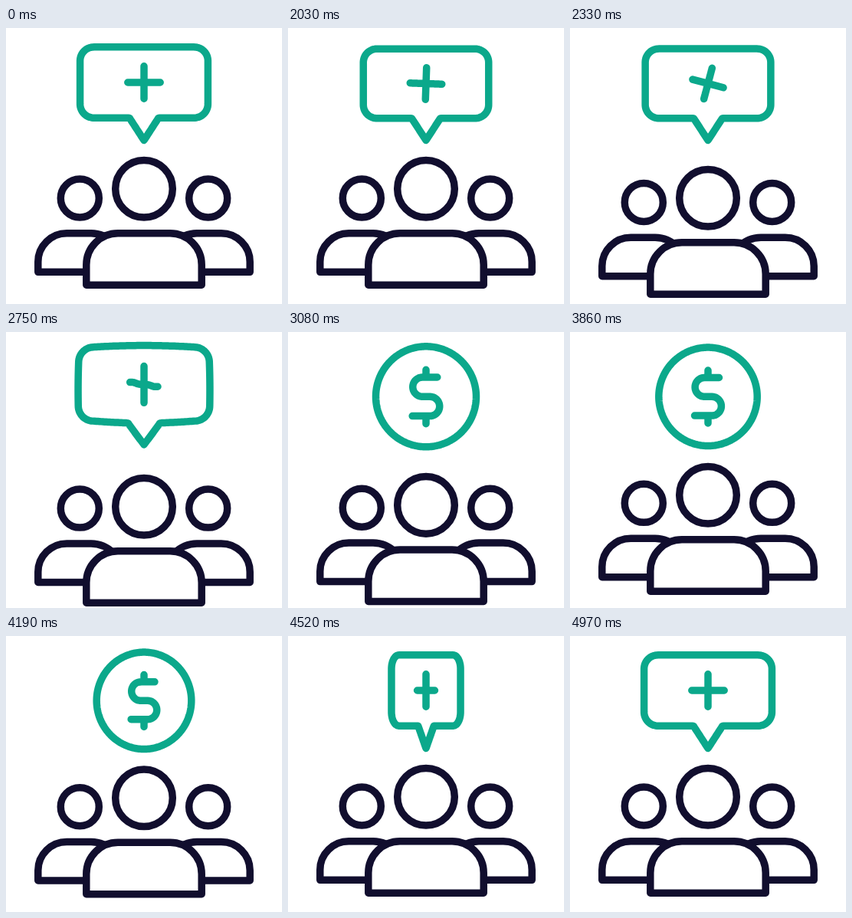
Animation of 360x360 px, one loop 5 s. Source, as an HTML page:

```html
<!DOCTYPE html>
<html lang="en">
<head>
<meta charset="utf-8">
<title>Group benefits</title>
<style>
  html, body { margin: 0; width: 100%; height: 100%; overflow: hidden; background: #fff; }
  svg { display: block; width: 100vw; height: 100vh; }
  g, path { stroke-width: 9.5; stroke-linecap: round; stroke-linejoin: round; }
  .people { stroke: #110e2e; fill: #fff; }
  .badge { stroke: #0ba88b; fill: none; }
</style>
</head>
<body>
<svg viewBox="0 0 360 360">
  <defs>
    <g id="side">
      <circle cx="96.3" cy="222" r="25"/>
      <path d="M106 318.3H41.8V305A37.5 37.3 0 0 1 79.5 267.8H111Q128 268 140 280" fill="none"/>
    </g>
  </defs>
  <g class="people">
    <g id="sides">
      <use href="#side"/>
      <use href="#side" transform="translate(360 0) scale(-1 1)"/>
    </g>
    <g id="lead">
      <circle cx="180" cy="209.7" r="37.3"/>
      <path d="M104.8 335.2V309A41.2 41.2 0 0 1 146 267.8H214A41.2 41.2 0 0 1 255.2 309V335.2Z"/>
    </g>
  </g>
  <g class="badge">
    <path id="frame"/>
    <path id="sign"/>
  </g>
</svg>
<script>
const LOOP = 5000, STEP = 30, CX = 180;
const PLUS_Y = 71, ARM = 21.2, TIP_Y = 146.5, COIN_Y = 84.3, COIN_R = 64.2;
const $ = id => document.getElementById(id);

// Motion tracks: [time, value] pairs
const tracks = {
  drop: [[2030, 0], [2120, 1], [2330, 12], [2560, 19], [2750, 18], [3100, 16], [3410, 9],
         [3640, 6], [3860, 3], [4190, 1.5], [4500, 0]],
  bubble: [[2000, 1], [2030, .98], [2190, .89], [2400, 1.03], [2560, 1.075], [2750, 1.06],
           [3060, 1], [4300, 1]],
  coin: [[2600, 1.03], [3080, 1.02], [3380, .9], [3410, .91], [3680, 1.03], [3860, 1], [4190, .985]],
  morph: [[2560, 0], [2750, .11], [2900, .5], [3080, 1]],
  spin: [[2000, -180], [2030, -178], [2300, -85], [2600, 0]],
  width: [[4170, 1], [4280, .58], [4370, .01], [4520, .54], [4660, .93], [4780, 1]]
};
const FLIP = 4370;

// Monotone cubic interpolation through a track
function slope(keys, i) {
  if (i === 0 || i === keys.length - 1) return 0;
  const rate = j => (keys[j + 1][1] - keys[j][1]) / (keys[j + 1][0] - keys[j][0]);
  const a = rate(i - 1), b = rate(i);
  return a * b <= 0 ? 0 : 2 * a * b / (a + b);
}
function at(name, t) {
  const keys = tracks[name], last = keys.length - 1;
  if (t <= keys[0][0]) return keys[0][1];
  if (t >= keys[last][0]) return keys[last][1];
  const i = keys.findIndex(k => k[0] > t) - 1;
  const [t0, v0] = keys[i], [t1, v1] = keys[i + 1];
  const h = t1 - t0, u = (t - t0) / h, w = 1 - u;
  return v0 * w * w * (1 + 2 * u) + v1 * u * u * (3 - 2 * u)
    + h * u * w * (w * slope(keys, i) - u * slope(keys, i + 1));
}

function sample(d, n) {
  const path = document.createElementNS("http://www.w3.org/2000/svg", "path");
  path.setAttribute("d", d);
  const len = path.getTotalLength();
  return Array.from({ length: n + 1 }, (_, i) => {
    const p = path.getPointAtLength(len * i / n);
    return [p.x, p.y];
  });
}

const N = 240, M = 80;
const bubblePts = sample("M180 146.5L161 117.2H114.6A18 18 0 0 1 96.6 99.2V42.8" +
  "A18 18 0 0 1 114.6 24.8H245.4A18 18 0 0 1 263.4 42.8V99.2A18 18 0 0 1 245.4 117.2H199Z", N);
const coinPts = bubblePts.map((_, i) => {
  const a = Math.PI * (.5 + 2 * i / N);
  return [CX + COIN_R * Math.cos(a), COIN_Y + COIN_R * Math.sin(a)];
});
const sPts = sample("M194.5 59.5H175.5A12.4 12.4 0 0 0 175.5 84.3H185A12.4 12.4 0 0 1 185 109.1H162.5", M);
const barPts = sPts.map((_, i) => [CX - ARM + 2 * ARM * i / M, PLUS_Y]);

// Each pair of strokes leaves the plus's centre and ends as a stub on the dollar
const plusStubs = [[[CX, PLUS_Y - ARM], [CX, PLUS_Y]], [[CX, PLUS_Y], [CX, PLUS_Y + ARM]]];
const coinStubs = [[[CX, 50], [CX, 59.5]], [[CX, 109.1], [CX, 119]]];

const scaler = (s, cy) => ([x, y]) => [CX + (x - CX) * s, cy + (y - cy) * s];
const rotator = deg => {
  const c = Math.cos(deg * Math.PI / 180), s = Math.sin(deg * Math.PI / 180);
  return ([x, y]) => [CX + (x - CX) * c - (y - PLUS_Y) * s, PLUS_Y + (x - CX) * s + (y - PLUS_Y) * c];
};
const line = pts => "M" + pts.map(p => p[0].toFixed(2) + " " + p[1].toFixed(2)).join("L");

function draw(t) {
  const drop = at("drop", t);
  $("lead").setAttribute("transform", `translate(0 ${drop})`);
  $("sides").setAttribute("transform", `translate(0 ${drop * .45})`);

  const m = t < FLIP ? at("morph", t) : 0;
  const wide = at("width", t);
  const inBubble = scaler(at("bubble", t), TIP_Y);
  const inCoin = scaler(at("coin", t), COIN_Y);
  const spin = rotator(at("spin", t));
  const blend = (from, to, turn = p => p) => line(from.map((p, i) => {
    const a = inBubble(turn(p)), b = inCoin(to[i]);
    return [CX + (a[0] + (b[0] - a[0]) * m - CX) * wide, a[1] + (b[1] - a[1]) * m];
  }));

  $("frame").setAttribute("d", blend(bubblePts, coinPts) + "Z");
  $("sign").setAttribute("d", blend(barPts, sPts, spin) +
    plusStubs.map((s, i) => blend(s, coinStubs[i], spin)).join(""));
}

const start = performance.now();
function tick() {
  const t = (performance.now() - start) % LOOP;
  draw(Math.floor((t - 20) / STEP) * STEP + 20);
  requestAnimationFrame(tick);
}
tick();
</script>
</body>
</html>
```
